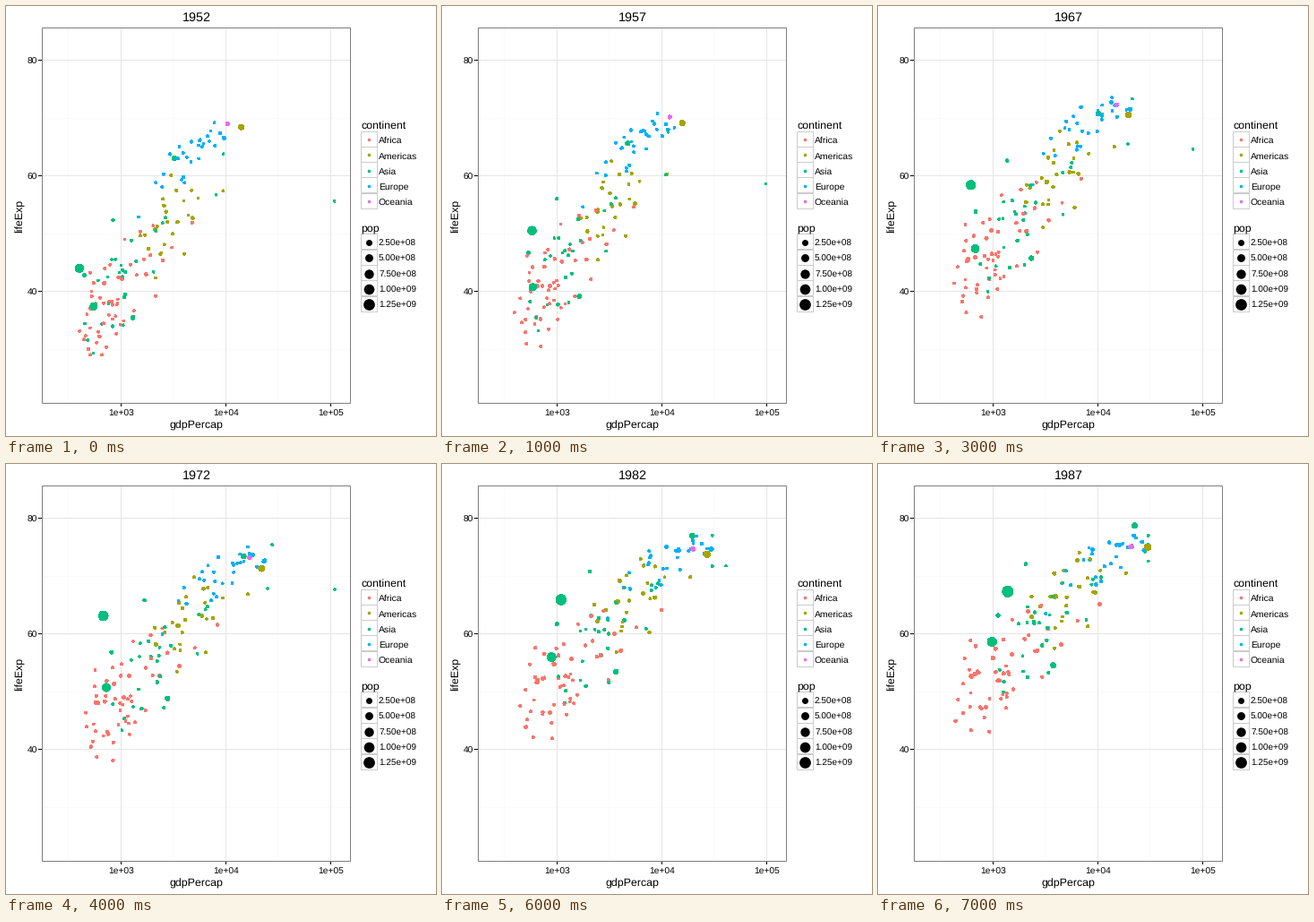
These frames come from a looping animation (480 px wide and 480 px high, 8 s). A matplotlib script:

```python
import numpy as np
import matplotlib.pyplot as plt
from matplotlib.animation import FuncAnimation
from matplotlib.patches import Rectangle

plt.rcParams["font.family"] = "Liberation Sans"
plt.rcParams["text.hinting"] = "none"
DPI = 80
PT = 72 / DPI  # points per pixel
STEPS = 8

# Colour, dots, log10 gdp at start and end, its spread (negative: tail to the
# poor side), life at start and end, its spread
CONTINENTS = {
    "Africa": ("#F8766D", 52, 2.99, 3.14, 0.32, 39, 53.5, 4.6),
    "Americas": ("#A3A500", 24, 3.47, 3.72, 0.23, 53, 68, 4.5),
    "Asia": ("#00BF7D", 29, 3.12, 3.60, 0.40, 45, 63.5, 5),
    "Europe": ("#00B0F6", 30, 3.70, 4.14, -0.24, 64, 73.5, 2),
    "Oceania": ("#E76BF3", 2, 4.01, 4.31, 0.015, 69.2, 75.3, 0.2),
}

# Dots that stand out: continent, population in millions,
# then (step, gdp, life) at the turns of the path
LEADERS = [
    ("Asia", 556, [(0, 400, 44), (1, 576, 50.5), (2, 488, 44.5),
                   (3, 613, 58.4), (4, 677, 63.1), (7, 1379, 67.3)]),
    ("Asia", 372, [(0, 547, 37.4), (4, 724, 50.7), (7, 977, 58.6)]),
    ("Asia", 86, [(0, 3217, 63), (4, 14779, 73.4), (7, 22376, 78.7)]),
    ("Asia", 0.2, [(0, 108400, 55.6), (3, 80900, 64.6), (4, 109300, 67.7),
                   (5, 59300, 69.3), (7, 28100, 74.2)]),
    ("Americas", 158, [(0, 13990, 68.4), (4, 21806, 71.3), (7, 29884, 75)]),
]


def radius(pop):
    """Dot radius in pixels for a population in millions."""
    size = 1 + 5 * np.sqrt(np.asarray(pop) / 1318.7)
    return 1.067 * size + 0.1


def area(r):
    return (2 * r * PT) ** 2


def to_px(log_gdp, life):
    return np.stack([128.5 + 117 * (log_gdp - 3), 60.5 + 6.45 * (80 - life)], axis=-1)


def cloud(rng, n, gdp0, gdp1, gdp_sd, life0, life1, life_sd):
    """Dots of one continent, rising quickly at first and then slower."""
    t = np.arange(STEPS)[:, None]
    ease = 1 - (1 - t / (STEPS - 1)) ** 1.4
    skewed = (rng.gamma(3, size=n) - 3) / 3 ** 0.5
    dx = gdp_sd * skewed.clip(-1.8, 2.6) * (0.85 + 0.2 * ease)
    dy = life_sd * rng.normal(size=n).clip(-2, 2)
    drift = rng.normal(size=(2, STEPS, n)).cumsum(axis=1) * min(abs(gdp_sd), 0.2) / 10
    gdp = gdp0 + (gdp1 - gdp0) * ease + dx + drift[0]
    slope = 15 - 5 * ease
    life = life0 + (life1 - life0) * ease + slope * dx + dy + 10 * drift[1]
    return to_px(gdp.clip(2.47, 4.48), life.clip(29, 77))


def path(turns):
    step, gdp, life = np.array(turns).T
    t = np.arange(STEPS)
    return to_px(np.interp(t, step, np.log10(gdp)), np.interp(t, step, life))


def build():
    rng = np.random.default_rng(5)
    tracks, pops, colors = [], [], []
    for color, n, *shape in CONTINENTS.values():
        tracks.append(cloud(rng, n, *shape))
        pops.extend((4 * np.exp(1.15 * rng.normal(size=n))).clip(0.1, 70))
        colors += [color] * n
    for name, pop, turns in LEADERS:
        tracks.append(path(turns)[:, None])
        pops.append(pop)
        colors.append(CONTINENTS[name][0])
    pop = np.array(pops) * 1.0193 ** (5 * np.arange(STEPS)[:, None])
    order = rng.permutation(len(colors))
    return (np.concatenate(tracks, axis=1)[:, order], pop[:, order],
            [colors[i] for i in order])


fig = plt.figure(figsize=(480 / DPI, 480 / DPI), dpi=DPI, facecolor="white")
ax = fig.add_axes([0, 0, 1, 1])
ax.set_xlim(0, 480)
ax.set_ylim(480, 0)
ax.axis("off")


def line(xs, ys, color, z=1):
    ax.plot(xs, ys, color=color, lw=PT, zorder=z, solid_capstyle="butt", snap=False)


def label(x, y, text, px, ha="left", va="baseline", **kw):
    return ax.text(x, y, text, fontsize=px * PT, ha=ha, va=va, color="black", **kw)


def box(x, y, w, h, color, z):
    ax.add_patch(Rectangle((x, y), w, h, fc="none", ec=color, lw=PT,
                           zorder=z, snap=False))


def dots(xy, r, color, z):
    xy = np.atleast_2d(xy)
    return ax.scatter(xy[:, 0], xy[:, 1], s=area(r), c=color, linewidths=0,
                      antialiased=False, zorder=z)


def legend(y, heading, entries, px):
    label(396, y - 12, heading, 12.4)
    for i, (text, color, r) in enumerate(entries):
        mid = y + 17.28 * i
        box(396.5, round(mid - 8.6) - 0.5, 18, 17, "#CCCCCC", 2)
        dots((405.2, mid), r, color, 3)
        label(416, mid + 4, text, px)


# Panel grid, border and axes
for i in range(3):
    line([69.5 + 117 * i] * 2, [24, 443], "#FAFAFA", 0)
    line([40, 384], [125.5 + 129 * i] * 2, "#FAFAFA", 0)
for i in range(3):
    x, y = 128.5 + 117 * i, 60.5 + 129 * i
    line([x, x], [24, 443], "#E5E5E5")
    line([40, 384], [y, y], "#E5E5E5")
    line([x, x], [443, 447], "black")
    line([36, 40], [y, y], "black")
    label(x, 458, f"1e+0{3 + i}", 10.3, "center")
    label(35, y + 4, str(80 - 20 * i), 10.3, "right")
box(40.5, 24.5, 344, 419, "#7F7F7F", 5)
label(212.5, 472, "gdpPercap", 12.4, "center")
label(16, 234, "lifeExp", 12.4, "center", "center", rotation=90)
title = label(212.5, 17, "1952", 14.4, "center")

legend(149.2, "continent", [(k, v[0], 1.8) for k, v in CONTINENTS.items()], 10.4)
legend(264, "pop", [(f"{p * 1e6:.2e}", "black", radius(p))
                    for p in range(250, 1251, 250)], 10)

track, people, colors = build()
points = dots(track[0], radius(people[0]), colors, 4)


def update(step):
    points.set_offsets(track[step])
    points.set_sizes(area(radius(people[step])))
    title.set_text(str(1952 + 5 * step))
    return points, title


anim = FuncAnimation(fig, update, frames=STEPS, interval=1000, repeat=True,
                     repeat_delay=0, blit=False)
plt.show()
```
